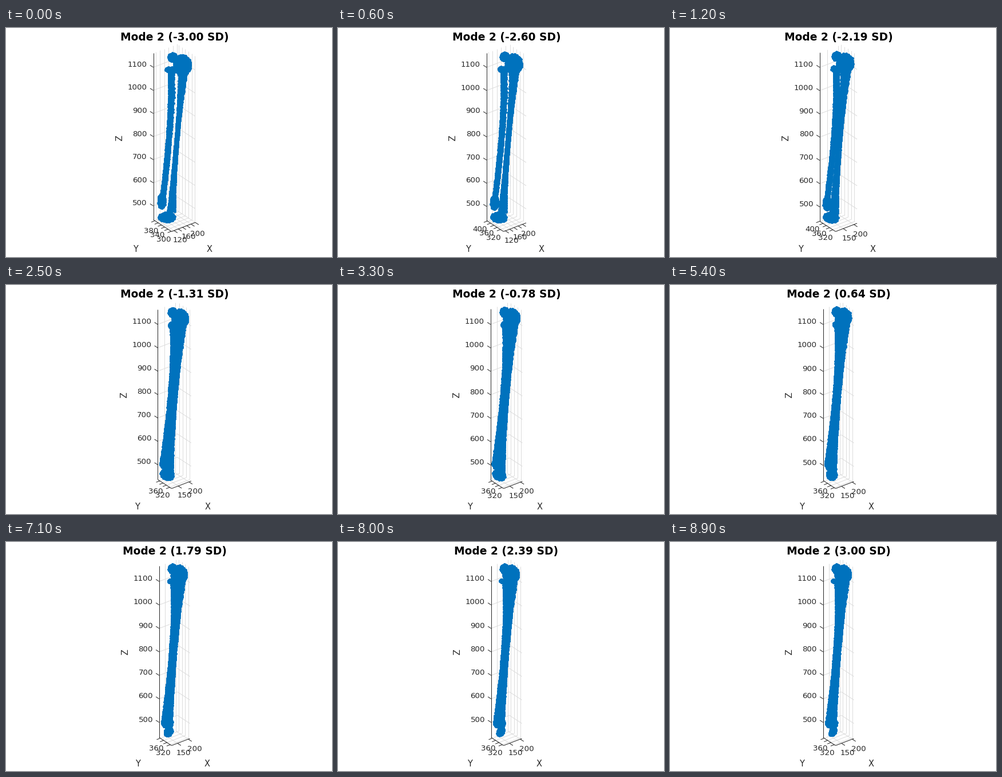
A matplotlib script that plays this animation: 570x402 px, repeating every 9000 ms.

```python
import numpy as np
import matplotlib.pyplot as plt
from matplotlib.animation import FuncAnimation
from matplotlib.collections import LineCollection

W, H, DPI = 570, 402, 96
FRAMES, INTERVAL = 90, 100
BLUE, DARK, GRID = "#0072BD", "#262626", "#dcdcdc"
DOT = 5.0  # marker diameter in pixels
CORNER = np.array([289.5, 357.3])

plt.rcParams["font.family"] = "DejaVu Sans"
fig = plt.figure(figsize=(W / DPI, H / DPI), dpi=DPI, facecolor="white")
ax = fig.add_axes([0, 0, 1, 1])
rng = np.random.default_rng(4)


def mix(u, low, mid, high=None):
    """Blend three poses for u in -1..1; with two, the upper half stays put."""
    low, mid = np.asarray(low, float), np.asarray(mid, float)
    if u < 0:
        return mid + (low - mid) * (-u) ** 1.7
    if high is None:
        return mid
    return mid + (np.asarray(high) - mid) * np.sin(np.pi / 2 * u)


# Point patterns: sunflower disc and low-discrepancy strip

def disc(n):
    k = np.arange(n)
    r, a = np.sqrt((k + .5) / n), k * np.pi * (3 - 5 ** .5)
    return np.array([r * np.cos(a), r * np.sin(a)]), rng.normal(0, .35, (2, n))


def strip(n, stray=0.0):
    k = np.arange(n)
    t = (k + .5) / n
    w = np.clip(1.15 * (2 * (k * .6180339887 % 1) - 1), -1, 1)
    w += rng.normal(0, .05, n)
    loose = (rng.random(n) < stray) & (w > 0) & (t < .55)
    return t, np.where(loose, w * 1.6, w)


HEAD, HOOK, FOOT, KNOB, LOBE = (disc(n) for n in (300, 150, 220, 90, 180))
TIBIA, FIBULA = strip(1100), strip(800, .14)


def blob(pattern, cx, cy, rx, ry, tilt=0.0):
    unit, noise = pattern
    x, y = unit * np.array([[rx - DOT / 2], [ry - DOT / 2]])
    c, s = np.cos(tilt), np.sin(tilt)
    return np.array([cx + x * c - y * s, cy + x * s + y * c]) + noise


def shaft(pattern, p0, p1, p2, waist, top, bottom):
    """Strip along a quadratic curve, flaring towards both ends."""
    t, w = pattern
    a, b, c = (1 - t) ** 2, 2 * t * (1 - t), t ** 2
    x, y = (a * p0[i] + b * p1[i] + c * p2[i] for i in (0, 1))
    half = waist + top * (1 - t) ** 6 + bottom * t ** 4
    return np.array([x + w * (half - DOT / 2), y])


def bones(u):
    def at(*poses):
        return mix(u, *poses)

    return np.hstack([
        blob(HEAD, *at((308, 65, 17.5, 20), (302.7, 57, 16, 18),
                       (302.3, 57, 16, 18))),
        blob(HOOK, *at((291, 51.5, 9.5, 9.5), (291, 47, 9, 10))),
        shaft(TIBIA, at((310, 70), (304.5, 66), (303.5, 66)),
              at((295, 225), (289, 225)),
              at((289, 322), (283, 330), (284.5, 330)),
              at(4.4, 6, 6.2), 5.5, at(4, 3, 0)),
        blob(FOOT, *at((281, 332, 16.5, 10.5), (281.5, 333.5, 13, 10.5),
                       (284.5, 333, 7, 10)), .6 * (1 + min(u, 0))),
        blob(KNOB, *at((285.5, 73, 9, 6.5), (291, 70, 6.5, 8),
                       (287, 68.5, 6.5, 5))),
        shaft(FIBULA, at((288.5, 72), (293, 70)),
              at((291, 165), (297, 165)),
              at((272, 312), (273, 318), (277, 312)), 5.7, 1, 0),
        blob(LOBE, *at((272, 304, 8.5, 15), (278.5, 313, 9.5, 14),
                       (282, 318, 12, 10))),
    ])


def ticks(lo, span, step):
    return np.arange(np.ceil(lo / step) * step, lo + span + .01, step)


def lines(segs, color, z):
    ax.add_collection(LineCollection(segs, colors=color, linewidths=.75,
                                     zorder=z, capstyle="butt"))


def label(x, y, s, size=10, ha="center", **kw):
    ax.text(x, y, s, fontsize=size, ha=ha, va="baseline", zorder=5,
            **{"color": DARK, **kw})


def draw_box(u):
    """Orthographic axes box whose limits refit to the data."""
    x_left, x_right, top = mix(u, (257.5, 331, 44), (267.7, 321.5, 42.3))
    x_min, y_min = mix(u, (108.4, 298), (122.7, 312))
    scale, z500 = mix(u, (.4055, 312.3), (.4122, 316.6))
    xdir = scale * np.array([.916, -.3515])
    ydir = scale * np.array([-.703, -.458])
    x_span = (x_right - CORNER[0]) / xdir[0]
    y_span = (x_left - CORNER[0]) / ydir[0]
    ex, ey = x_span * xdir, y_span * ydir
    left, right = CORNER + ey, CORNER + ex
    up = np.array([0, top - left[1]])
    grid, marks = [], []

    def floor_ticks(lo, span, step, skip, along, across, mark, shift):
        for i, v in enumerate(ticks(lo, span, step)):
            p = CORNER + (v - lo) * along
            grid.extend([(p, p + across), (p + across, p + across + up)])
            marks.append((p, p + mark))
            if i % skip == 0:
                label(*(p + shift), f"{v:.0f}")

    # Crowded axes label every other tick
    step, skip = (20, 2) if x_span > 104 else (50, 1)
    floor_ticks(x_min, x_span, step, skip, xdir, ey, (6, 3.9), (10.8, 20.5))
    floor_ticks(y_min, y_span, 20, 2, ydir, ex, (-6.3, 2.4), (-12.7, 18))

    for v in range(500, 1101, 100):
        p = np.array([left[0], z500 - (v - 500) * scale])
        grid.extend([(p, p + ex), (p + ex, p + ex - ey)])
        marks.append((p, p + [-5.6, -3.7]))
        label(p[0] - 10.7, p[1] - 1.1, str(v), ha="right")

    lines(grid, GRID, 1)
    lines([(left, left + up), (left, CORNER), (CORNER, right)] + marks, DARK, 4)


def draw(i):
    sd = -3 + 6 * i / (FRAMES - 1)
    u = sd / 3
    ax.clear()
    ax.set(xlim=(0, W), ylim=(H, 0))
    ax.axis("off")
    draw_box(u)
    ax.plot(*bones(u), "o", color=BLUE, ms=DOT * 72 / DPI, mew=0, zorder=3)
    label(294.5, 22, f"Mode 2 ({sd:.2f} SD)", 14, weight="bold", color="black")
    x_lab, y_lab, z_lab, base = mix(u, (356, 226.5, 203, 392.6),
                                    (352, 230.4, 213.6, 394))
    label(x_lab, base, "X", 11)
    label(y_lab, base, "Y", 11)
    label(z_lab, 192.5, "Z", 11, rotation=90, rotation_mode="anchor")
    return []


anim = FuncAnimation(fig, draw, frames=FRAMES, init_func=lambda: [],
                     interval=INTERVAL, repeat=True, repeat_delay=0)
plt.show()
```
